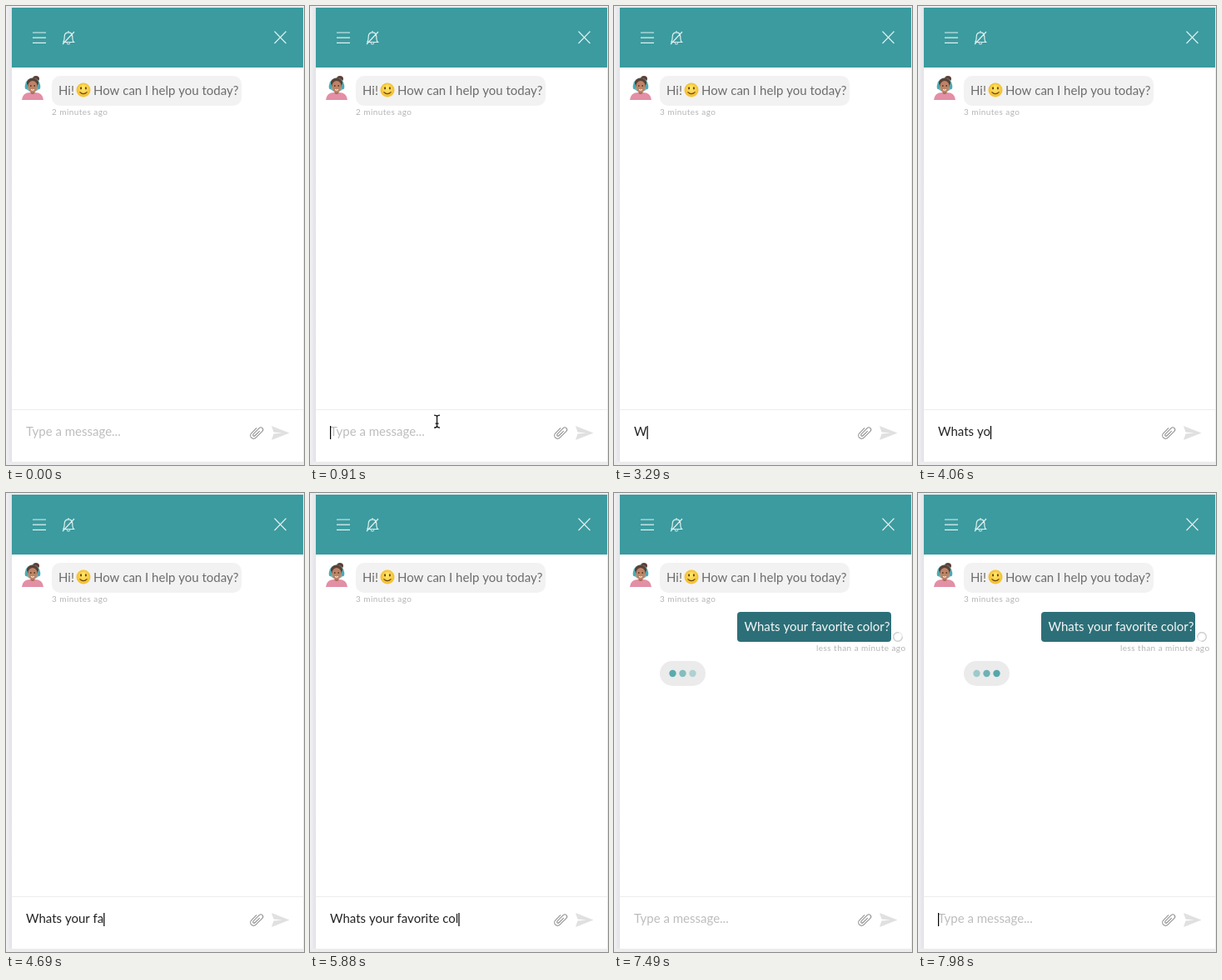
An HTML page with a canvas that plays this animation: 358x552 px, repeating every 8 s.

```html
<!DOCTYPE html>
<html lang="en">
<head>
<meta charset="utf-8">
<style>
  html, body { margin: 0; width: 100%; height: 100%; overflow: hidden; background: #fff; }
  canvas { display: block; width: 358px; height: 552px; }
</style>
</head>
<body>
<canvas></canvas>
<script>
const W = 358, H = 552, LOOP = 8000, STEP = 70;
const MESSAGE = 'Whats your favorite color?';
// Moment at which each character of MESSAGE is typed.
const KEYS = [3290, 3360, 3500, 3640, 3710, 3850, 3990, 4060, 4130, 4340, 4410, 4550, 4690,
  4830, 4970, 5040, 5180, 5320, 5460, 5530, 5670, 5810, 5880, 6090, 6160, 6370];
const MINUTE = 3080, SENT = 6510, REPLYING = 7420;
// Pointer path: time, x, y.
const PATH = [[70, 306, 556], [350, 314, 48], [700, 215, 330], [980, 141, 531],
  [1260, 141, 531], [1470, 128, 508]];

const canvas = document.querySelector('canvas');
const ctx = canvas.getContext('2d');
const scale = window.devicePixelRatio || 1;
canvas.width = W * scale;
canvas.height = H * scale;

const clamp = v => Math.max(0, Math.min(1, v));
const ease = v => v * v * (3 - 2 * v);

function rect(x, y, w, h, color, radius = 0) {
  ctx.fillStyle = color;
  ctx.beginPath();
  ctx.roundRect(x, y, w, h, radius);
  ctx.fill();
}

function ellipse(x, y, rx, ry, color) {
  ctx.fillStyle = color;
  ctx.beginPath();
  ctx.ellipse(x, y, rx, ry, 0, 0, Math.PI * 2);
  ctx.fill();
}

function stroke(path, color, width = 1) {
  ctx.strokeStyle = color;
  ctx.lineWidth = width;
  ctx.stroke(new Path2D(path));
}

function fill(path, color) {
  ctx.fillStyle = color;
  ctx.fill(new Path2D(path));
}

function text(str, x, y, color, size = 15, spacing = 0) {
  ctx.font = `${size}px Lato, sans-serif`;
  ctx.letterSpacing = spacing + 'px';
  ctx.fillStyle = color;
  ctx.fillText(str, x, y);
  return ctx.measureText(str).width;
}

const stamp = (str, x, y) => text(str, x, y, '#b4b4b4', 10, 0.45);

function at(x, y, draw, angle = 0) {
  ctx.save();
  ctx.translate(x, y);
  ctx.rotate(angle);
  draw();
  ctx.restore();
}

function drawWindow() {
  rect(0, 0, W, H, '#ececee');
  const shade = ctx.createLinearGradient(0, 0, 7, 0);
  shade.addColorStop(0, '#f2f2f4');
  shade.addColorStop(1, '#e2e2e7');
  rect(0, 2, 7, 546, shade);
  rect(7, 2, 350, 546, '#fff');
  rect(7, 2, 350, 72, '#3b9b9f');
  rect(7, 485, 350, 1, '#ededed');
}

function drawHeader() {
  const white = 'rgba(255,255,255,.85)';
  stroke('M32 32H48M32 38.2H48M32 44.4H48', white, 1.2);
  stroke('M322.5 30.5L336.5 45M336.5 30.5L322.5 45', white, 1.1);
  stroke('M68.5 43.5H81.5C79.8 42 79.8 40 79.8 37C79.8 33.5 78 31.8 75 31.8C72 31.8 70.2 33.5 70.2 37'
    + 'C70.2 40 70.2 42 68.5 43.5M73 44.5Q75 47.5 77 44.5M75 31.8V30M68 46L82 31', white, 1.2);
}

function drawAvatar() {
  at(32, 100, () => {
    ellipse(4, -12.5, 4, 3.6, '#5b4037');
    ellipse(0, -5, 9, 8.5, '#63c3cd');
    ellipse(0, -7, 7.2, 6.5, '#5b4037');
    fill('M-13 13Q-12 4 -3 4H3Q12 4 13 13Z', '#e38fa6');
    rect(-2.5, 0, 5, 6, '#a76f55', 2);
    ellipse(0, -3, 5.7, 7, '#bd8465');
    ellipse(-7.5, -3, 1.8, 3.2, '#4ba9b6');
    ellipse(7.5, -3, 1.8, 3.2, '#4ba9b6');
    ellipse(-2.2, -4, 0.8, 0.9, '#49322b');
    ellipse(2.2, -4, 0.8, 0.9, '#49322b');
    stroke('M-2 .5Q0 2 2 .5', '#fff', 1);
  });
}

function drawSmiley() {
  at(93, 101, () => {
    const glow = ctx.createRadialGradient(0, -3, 1, 0, 0, 9);
    glow.addColorStop(0, '#ffe76a');
    glow.addColorStop(1, '#f3b928');
    ellipse(0, 0, 8.5, 8.5, glow);
    ellipse(-2.9, -2.2, 1.1, 1.6, '#6b4615');
    ellipse(2.9, -2.2, 1.1, 1.6, '#6b4615');
    stroke('M-4.5 2.3Q0 7 4.5 2.3', '#6b4615', 1.2);
  });
}

function drawGreeting(t) {
  drawAvatar();
  rect(55, 84, 228, 36, '#f2f2f2', 10);
  text('Hi!', 63, 107, '#6c6c6c');
  drawSmiley();
  text('How can I help you today?', 105, 107, '#6c6c6c');
  stamp(`${t < MINUTE ? 2 : 3} minutes ago`, 55, 131);
}

function drawSent(t) {
  ctx.globalAlpha = clamp((t - SENT + STEP) / 140);
  rect(148, 143, 185, 36, '#2d6f78', 4);
  text(MESSAGE, 156.5, 166, '#f4f8f8');
  stamp('less than a minute ago', 243, 190);
  at(341, 173, () => {
    ctx.lineWidth = 1.4;
    ctx.strokeStyle = '#cfcfcf';
    ctx.beginPath();
    ctx.arc(0, 0, 5.3, 0, Math.PI * 1.6);
    ctx.stroke();
    ctx.strokeStyle = '#ececec';
    ctx.beginPath();
    ctx.arc(0, 0, 5.3, Math.PI * 1.6, Math.PI * 2);
    ctx.stroke();
  }, (t - SENT) / 1000 * Math.PI * 2);
  ctx.globalAlpha = 1;
}

function drawReplying(t) {
  const shown = clamp((t - REPLYING + STEP) / 140);
  ctx.globalAlpha = shown;
  rect(55, 202, 55, 30, '#ebebeb', 15);
  for (let i = 0; i < 3; i++) {
    const wave = Math.cos((t - 7980 + (2 - i) * 200) / 1200 * Math.PI * 2);
    ctx.globalAlpha = shown * (0.57 + 0.28 * wave);
    ellipse(70.5 + i * 12, 217, 4.2, 4.2, '#3b9b9f');
  }
  ctx.globalAlpha = 1;
}

function drawInput(t) {
  const typed = t < SENT ? KEYS.filter(k => k <= t).length : 0;
  let end = 0;
  if (typed) end = text(MESSAGE.slice(0, typed), 24, 517, '#242424');
  else text('Type a message...', 24, 517, '#bdbdbd');

  let phase = t + 510;
  if (t >= SENT) phase = t - SENT;
  else if (typed) phase = t - KEYS[typed - 1];
  else if (t >= MINUTE) phase = 500;
  if (phase % 1010 < 500) rect(24 + end, 505, 1.2, 16, '#000');

  at(301, 513, () => stroke('M-3.8 -4V5A3.8 3.8 0 0 0 3.8 5V-6A2.6 2.6 0 0 0 -1.5 -6V4A1.3 1.3 0 0 0 1.3 4V-4',
    '#929292', 1.1), Math.PI / 4);
  fill('M319 505L340.5 513.5L319 522L321.5 514.5L332 513.5L321.5 512.5Z', '#e0e0e0');
}

function drawPointer(t) {
  if (t < PATH[0][0] || t >= MINUTE) return;
  let i = PATH.findIndex(p => p[0] > t);
  if (i < 0) i = PATH.length - 1;
  const [t0, x0, y0] = PATH[i - 1], [t1, x1, y1] = PATH[i];
  const k = ease(clamp((t - t0) / (t1 - t0)));
  const y = y0 + (y1 - y0) * k;
  at(x0 + (x1 - x0) * k, y, () => {
    if (y > 490 && y < 546) {
      const beam = 'M-3.5 -7.5Q0 -7.5 0 -5.5Q0 -7.5 3.5 -7.5M0 -5.5V5.5M-3.5 7.5Q0 7.5 0 5.5Q0 7.5 3.5 7.5M-2 2.5H2';
      stroke(beam, '#fff', 2.6);
      stroke(beam, '#111', 1.3);
    } else {
      const arrow = 'M0 0V14L3.3 11L5.5 16L7.8 15L5.6 10.2H10Z';
      stroke(arrow, '#fff', 2);
      fill(arrow, '#000');
    }
  });
}

function frame(now) {
  const t = Math.floor((now % LOOP) / STEP + 1e-6) * STEP;
  ctx.setTransform(scale, 0, 0, scale, 0, 0);
  drawWindow();
  drawHeader();
  drawGreeting(t);
  if (t >= SENT) drawSent(t);
  if (t >= REPLYING) drawReplying(t);
  drawInput(t);
  drawPointer(t);
  requestAnimationFrame(() => frame(performance.now()));
}
frame(performance.now());
</script>
</body>
</html>
```
